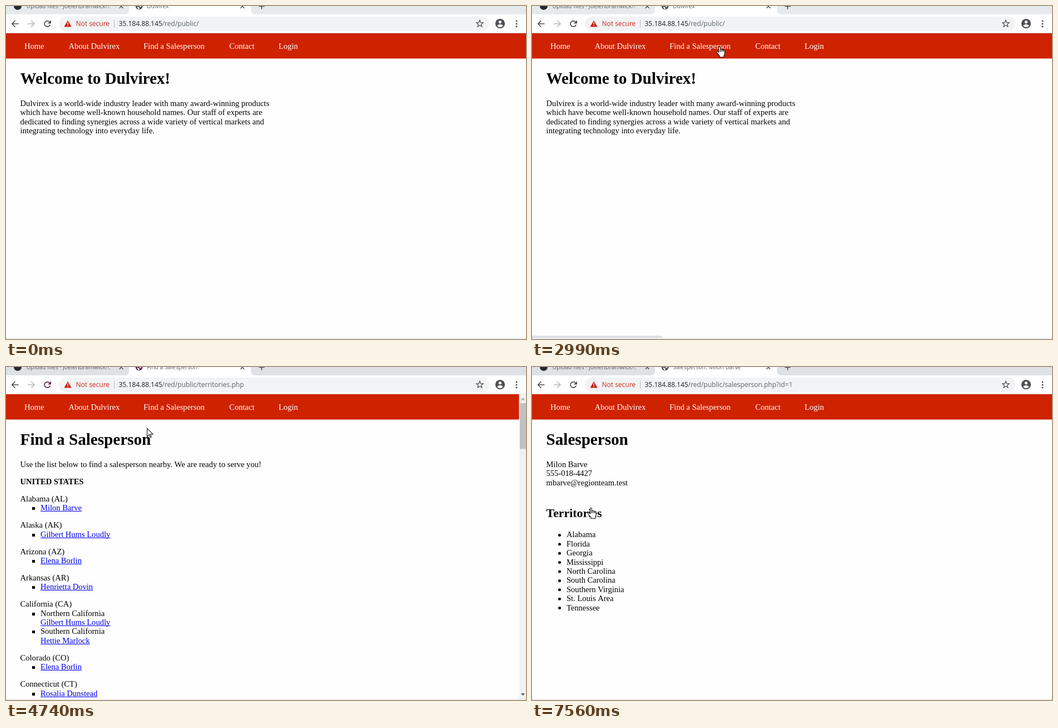
Write an HTML page with a canvas that moves like this. It is 934 by 599 pixels and loops after 8000 ms.

```html
<!DOCTYPE html>
<html lang="en">
<head>
<meta charset="utf-8">
<title>Browser walkthrough</title>
<style>
html, body { margin: 0; width: 100%; height: 100%; overflow: hidden; background: #fefefe; }
canvas { display: block; }
</style>
</head>
<body>
<canvas id="stage" width="934" height="599"></canvas>
<script>
const W = 934, H = 599, LOOP = 8000;
const ctx = document.getElementById('stage').getContext('2d');
const SERIF = '"Liberation Serif", serif';
const SANS = '"Open Sans", sans-serif';
const ZOOM = 0.91, BODY = 16 * ZOOM, LINE = 16.4;
const BRAND = 'Dulvirex';
const LOAD_TITLE = 'https://35.184.88.145/red/public/';
const ICON = '#4a4d51';

const ARROW = new Path2D('M.5 .5V16.5L4.5 12.7 7 18.3 9 17.4 6.6 12H12z');
const HAND = new Path2D('M5.5 12V2a1.5 1.5 0 0 1 3 0v5a1.5 1.2 0 0 1 3 .5a1.5 1.2 0 0 1 3 .6a1.4 1.2 0 0 1 2.5 .9v5.5c0 2-1.5 3-1.5 4.5v2.5h-8.5v-2.5c-2-2-4.5-5-5.5-7c-1-2 .8-3 2-1.8z');
const KNUCKLES = new Path2D('M8.5 7v4M11.5 7.5v3.5M14.5 8v3');

function rect(x, y, w, h, color) {
  ctx.fillStyle = color;
  ctx.fillRect(x, y, w, h);
}

function round(x, y, w, h, r, color) {
  ctx.fillStyle = color;
  ctx.beginPath();
  ctx.roundRect(x, y, w, h, r);
  ctx.fill();
}

function disc(x, y, r, color) {
  ctx.fillStyle = color;
  ctx.beginPath();
  ctx.arc(x, y, r, 0, Math.PI * 2);
  ctx.fill();
}

function stroke(path, color, width = 1.6) {
  ctx.strokeStyle = color;
  ctx.lineWidth = width;
  ctx.stroke(new Path2D(path));
}

function text(str, x, y, font, color = '#000') {
  ctx.font = font;
  ctx.fillStyle = color;
  ctx.fillText(str, x, y);
}

const serif = (str, x, y, color) => text(str, x, y, `${BODY}px ${SERIF}`, color);
const heading = (str, y, size = 32) => text(str, 25.6, y, `bold ${size * ZOOM}px ${SERIF}`);
const lines = (list, y) => list.forEach((s, i) => serif(s, 25.6, y + i * LINE));

function link(str, x, y) {
  serif(str, x, y, '#0000ee');
  rect(x, Math.round(y) + 1, ctx.measureText(str).width, 1, '#0000ee');
}

/* Tab titles fade out at their right end. */
function tabTitle(str, x, end) {
  const fade = ctx.createLinearGradient(end - 22, 0, end, 0);
  fade.addColorStop(0, '#5a5e63');
  fade.addColorStop(1, 'rgba(90,94,99,0)');
  ctx.save();
  ctx.beginPath();
  ctx.rect(x, 0, end - x, 12);
  ctx.clip();
  text(str, x, 4, `10.4px ${SANS}`, fade);
  ctx.restore();
}

function cross(x, y, r, width) {
  stroke(`M${x - r} ${y - r}L${x + r} ${y + r}M${x + r} ${y - r}L${x - r} ${y + r}`, ICON, width);
}

function globe(x, y, color) {
  disc(x, y, 6.5, color);
  ctx.fillStyle = '#fff';
  ctx.fill(new Path2D(`M${x + 1} ${y - 4}h3l1 4-3 2-2-2-3-1zM${x - 4} ${y + 1}l4 1 1 3-2 1z`));
}

function reload(color) {
  ctx.strokeStyle = color;
  ctx.lineWidth = 1.7;
  ctx.beginPath();
  ctx.arc(74.3, 32, 5.2, 0.3, Math.PI * 1.76);
  ctx.stroke();
  ctx.fillStyle = color;
  ctx.fill(new Path2D('M81 25.5v6h-6z'));
}

function star(x, y) {
  ctx.beginPath();
  for (let i = 0; i < 10; i++) {
    const r = i % 2 ? 2.8 : 6.4, a = i * Math.PI / 5 - Math.PI / 2;
    ctx.lineTo(x + r * Math.cos(a), y + r * Math.sin(a));
  }
  ctx.closePath();
  ctx.strokeStyle = ICON;
  ctx.lineWidth = 1.3;
  ctx.stroke();
}

function chrome(s) {
  rect(0, 0, W, 49, '#fff');
  const idle = '#e7eaed', active = '#dee1e6';
  round(-10, -10, 231, 25, [0, 0, 7, 0], s.t < 3150 ? idle : active);
  round(440, -10, W, 25, [0, 0, 0, 7], s.t < 3630 ? idle : active);
  if (s.t >= 3150 && s.t < 3630) rect(447, 0, 18, 15, active);

  disc(21, 0, 7, '#24292e');
  tabTitle('Upload files · JoelenBramwick/c', 36.5, 196);
  cross(207, 0.5, 3.4, 1.4);
  if (s.favicon) globe(239, 0, s.tint);
  tabTitle(s.title, 253, 411);
  cross(424.5, 0.5, 3.4, 1.4);
  stroke('M454 .5H464.5M459.3 -5V5.7', ICON, 1.6);

  stroke('M22.5 32H11M16.5 26.2L10.7 32L16.5 37.8', ICON);
  stroke('M39 32H50.5M45.2 26.2L51 32L45.2 37.8', '#b7babd');
  if (s.loading) cross(74.5, 32, 5, 1.7);
  else reload(s.tint);

  round(95, 19, 773, 26, 13, '#f1f3f4');
  ctx.fillStyle = '#d01c10';
  ctx.fill(new Path2D('M111 26L117.6 37.6H104.4z'));
  rect(110.3, 29.5, 1.4, 4, '#fff');
  rect(110.3, 34.6, 1.4, 1.4, '#fff');
  const font = `12px ${SANS}`;
  text('Not secure', 125.5, 36.3, font, '#d2281c');
  rect(194, 25, 1, 14, '#b4b7ba');
  text('35.184.88.145', 202.5, 36.3, font, '#202124');
  text('/red/public/' + s.file, 280.5, 36.3, font, '#5f6368');

  star(851, 32);
  disc(887.5, 31.7, 8.6, '#4d5055');
  disc(887.5, 28.8, 2.6, '#fff');
  ctx.fillStyle = '#fff';
  ctx.fill(new Path2D('M882.3 35.6c1-3.6 9.4-3.6 10.4 0c-2.6 3.4-7.8 3.4-10.4 0z'));
  for (const y of [27, 32, 37]) disc(917, y, 1.5, ICON);
  rect(0, 48, W, 1, '#e4e5e7');
}

function nav(width) {
  rect(0, 49, width, 45.5, '#cf2200');
  const items = [['Home', 33], ['About ' + BRAND, 112.5], ['Find a Salesperson', 247],
    ['Contact', 401], ['Login', 489.5]];
  for (const [label, x] of items) serif(label, x, 77.3, '#fff');
}

function homePage() {
  nav(W);
  heading(`Welcome to ${BRAND}!`, 140);
  lines([
    BRAND + ' is a world-wide industry leader with many award-winning products',
    'which have become well-known household names. Our staff of experts are',
    'dedicated to finding synergies across a wide variety of vertical markets and',
    'integrating technology into everyday life.'
  ], 180);
}

/* Plain rows are names; a pair adds a region above the name. */
const STATES = [
  ['Alabama (AL)', 'Milon Barve'],
  ['Alaska (AK)', 'Gilbert Hums Loudly'],
  ['Arizona (AZ)', 'Elena Borlin'],
  ['Arkansas (AR)', 'Henrietta Dovin'],
  ['California (CA)', ['Northern California', 'Gilbert Hums Loudly'],
    ['Southern California', 'Hettie Marlock']],
  ['Colorado (CO)', 'Elena Borlin'],
  ['Connecticut (CT)', 'Rosalia Dunstead']
];

function scrollbar() {
  rect(922, 49, 12, 548, '#f1f1f1');
  rect(923, 65, 11, 82.5, '#c1c1c1');
  ctx.fillStyle = '#a3a3a3';
  ctx.fill(new Path2D('M925 59.5L928.5 55.5L932 59.5z'));
  ctx.fillStyle = '#505050';
  ctx.fill(new Path2D('M925 587L928.5 591L932 587z'));
}

function listPage() {
  nav(921.5);
  heading('Find a Salesperson', 140);
  serif('Use the list below to find a salesperson nearby. We are ready to serve you!', 25.6, 180);
  text('UNITED STATES', 25.6, 210.8, `bold ${BODY}px ${SERIF}`);
  let y = 241.8;
  for (const [state, ...rows] of STATES) {
    serif(state, 25.6, y);
    for (const row of rows) {
      y += LINE;
      rect(47, Math.round(y) - 6, 5, 5, '#000');
      if (Array.isArray(row)) {
        serif(row[0], 62, y);
        y += LINE;
        link(row[1], 62, y);
      } else link(row, 62, y);
    }
    y += LINE + BODY;
  }
  scrollbar();
}

function personPage() {
  nav(W);
  heading('Salesperson', 140);
  lines(['Milon Barve', '555-018-4427', 'mbarve@regionteam.test'], 180);
  heading('Territories', 270, 24);
  ['Alabama', 'Florida', 'Georgia', 'Mississippi', 'North Carolina', 'South Carolina',
    'Southern Virginia', 'St. Louis Area', 'Tennessee'].forEach((name, i) => {
    const y = 306.4 + i * LINE;
    disc(49.5, y - 4, 2.5, '#000');
    serif(name, 62, y);
  });
}

function statusBar(t) {
  let width = 0, alpha = 1;
  if (t >= 2990 && t < 4090) {
    width = t < 3150 ? 234 : 308;
    if (t >= 4010) alpha = 0.5;
  } else if (t >= 5590 && t < 7560) {
    width = 272;
    if (t < 5660) alpha = 0.5;
  }
  if (!width) return;
  ctx.globalAlpha = alpha;
  round(-5, 593, width + 5, 5, [0, 4, 0, 0], '#dee1e6');
  ctx.globalAlpha = 1;
}

/* Pointer moves: start, interval, then the places reached. */
const mix = (a, b, p) => a + (b - a) * p;

function along(points, p) {
  const k = Math.min(p, 0.9999) * (points.length - 1), i = Math.floor(k);
  return [0, 1].map(c => mix(points[i][c], points[i + 1][c], k - i));
}

function pointer(t) {
  if (t < 360) return null;
  if (t < 430) return [758, 454];
  if (t < 510) return [660, 400];
  if (t < 1700) return [582, 360];
  if (t < 1780) return [547, 352];
  if (t < 2000) return [504, 347];
  if (t < 4740) {
    const p = Math.min(Math.floor((t - 2000) / 76) + 1, 11) / 11;
    return along([[504, 347], [336.5, 72.5]], p * p * (3 - 2 * p));
  }
  const p = Math.min(Math.floor((t - 4740) / 77), 10) / 10;
  return along([[253, 110], [180, 180], [122, 237], [101.5, 251], [105.5, 253]], p);
}

function drawPointer(t) {
  const at = pointer(t);
  if (!at) return;
  const [x, y] = at;
  const click = (t >= 3080 && t < 3310) || (t >= 6850 && t < 7020);
  if (click) disc(x, y, 10.5, 'rgba(255,243,50,.72)');
  const overLink = (y > 49 && y < 94) || (t > 5200 && x < 137 && y > 246);
  ctx.save();
  ctx.translate(overLink ? x - 6.5 * ZOOM : x, y);
  ctx.scale(ZOOM, ZOOM);
  ctx.fillStyle = '#fff';
  ctx.strokeStyle = '#000';
  ctx.lineWidth = 1.1;
  const shape = overLink ? HAND : ARROW;
  ctx.fill(shape);
  ctx.stroke(shape);
  if (overLink) ctx.stroke(KNUCKLES);
  ctx.restore();
}

function stateAt(t) {
  const s = { t, title: BRAND, file: '', favicon: true, loading: false, tint: ICON, page: homePage };
  if (t >= 7170) {
    Object.assign(s, { title: 'Salesperson: Milon Barve', file: 'salesperson.php?id=1', page: personPage });
  } else if (t >= 3700) {
    Object.assign(s, { title: 'Find a Salesperson', file: 'territories.php', page: listPage, tint: '#5a2850' });
    if (t >= 7090) {
      Object.assign(s, { title: LOAD_TITLE, file: 'salesperson.php?id=1', favicon: false, loading: true });
    }
  } else if (t >= 3150) {
    const loading = t >= 3310;
    Object.assign(s, { title: LOAD_TITLE, file: 'territories.php', favicon: !loading, loading });
  }
  return s;
}

function draw() {
  const s = stateAt(performance.now() % LOOP);
  rect(0, 0, W, H, '#fefefe');
  chrome(s);
  s.page();
  rect(0, 597, W, 2, '#fefefe');
  rect(0, 597, W, 1, '#e2e3e5');
  statusBar(s.t);
  drawPointer(s.t);
  requestAnimationFrame(draw);
}
draw();
</script>
</body>
</html>
```
